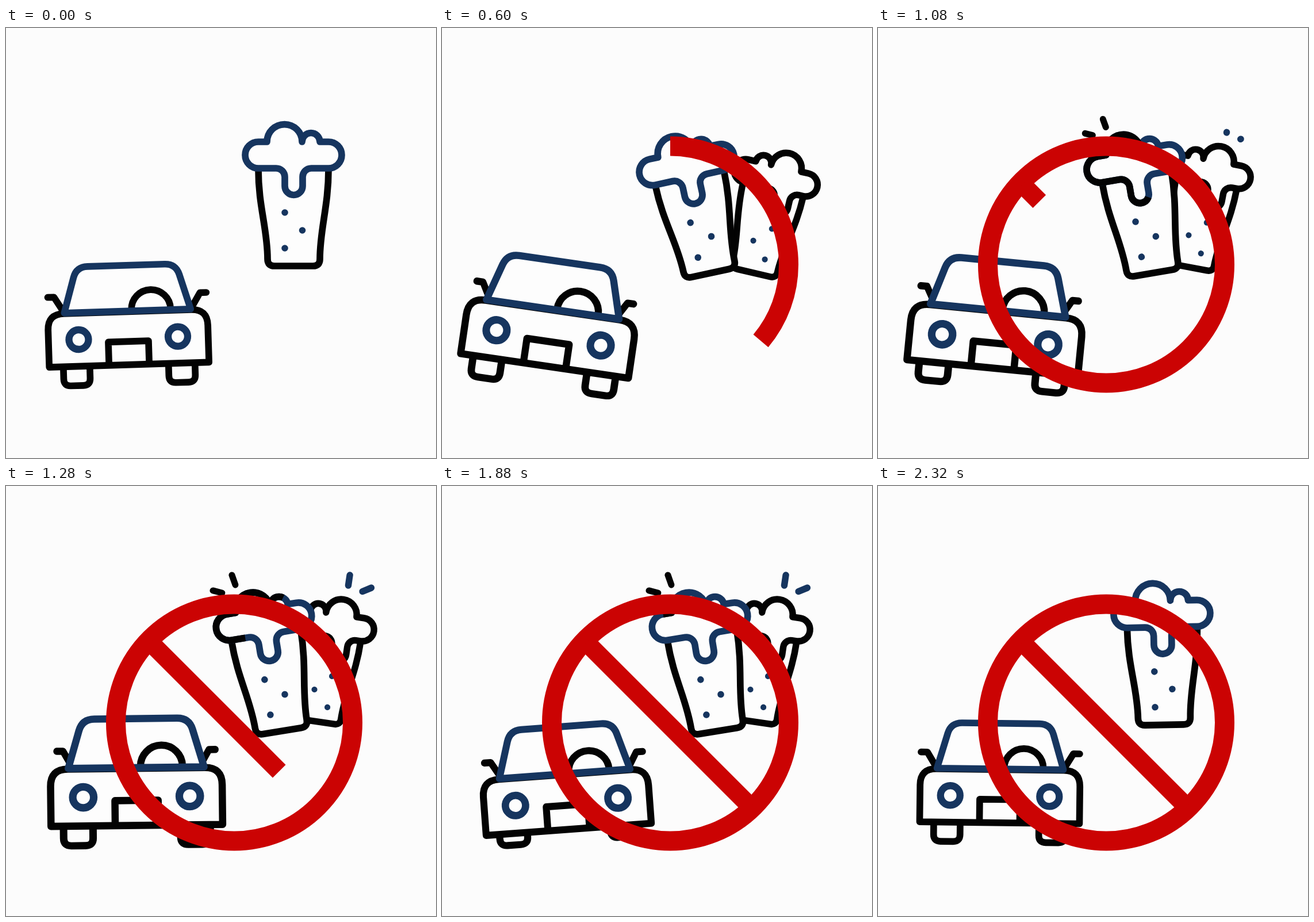
An HTML page with a canvas for the animation above (2.36 s loop, 748 by 748 pixels).

```html
<!DOCTYPE html>
<html lang="en">
<head>
<meta charset="utf-8">
<title>Don't drink and drive</title>
<style>
  html, body { margin: 0; width: 100%; height: 100%; overflow: hidden; background: #fcfcfc; }
  canvas { display: block; width: 100vw; height: 100vh; }
</style>
</head>
<body>
<canvas id="stage" width="748" height="748"></canvas>
<script>
const ctx = document.getElementById('stage').getContext('2d');
const LOOP = 2360, STEP = 40;
const BLUE = '#16355f', BLACK = '#030303', RED = '#cb0303', PAPER = '#fcfcfc', FILL = '#fdfdfd';

// Beer foam; the drip can sit further to one side.
const foam = shift => new Path2D(
  `M439 198H454A30.5 30.5 0 0 1 515 198A15.5 15.5 0 0 1 546 198H561A23 23 0 0 1 561 244
   H${531 - shift}a15 15 0 0 0 -15 15v16a15.5 15.5 0 0 1 -31 0v-16a15 15 0 0 0 -15 -15
   H439A23 23 0 0 1 439 198Z`);
const FOAM_LENGTH = 508;
const FRONT_FOAM = foam(0), REAR_FOAM = foam(21.5);
const GLASS = new Path2D('M439 246C439 310 455 350 455 402Q455 414 467 414H534Q546 414 546 402' +
  'C546 350 561 310 561 246');

const BODY = new Path2D('M-139 46.5V-18Q-139 -46 -111 -46H111Q139 -46 139 -18V46.5Z');
const SCREEN = new Path2D('M-110 -47L-92 -108Q-86.5 -126.5 -67 -126.5H67Q86.5 -126.5 92 -108L110 -47Z');
const STEERING = new Path2D('M7 -49A34 34 0 0 1 75 -49');
const PLATE = new Path2D('M-35 46V6H35V46');
const MIRRORS = new Path2D('M-138 -75H-127L-113 -52M138 -75H127L113 -52');

// Smooth progress from 0 to 1 between two times.
function ease(t, from, to) {
  const u = Math.min(1, Math.max(0, (t - from) / (to - from)));
  return u * u * (3 - 2 * u);
}

function place(x, y, degrees, sx, sy, draw) {
  ctx.save();
  ctx.translate(x, y);
  ctx.rotate(degrees * Math.PI / 180);
  ctx.scale(sx, sy);
  draw();
  ctx.restore();
}

function stroke(path, color, width = 11.7) {
  ctx.strokeStyle = color;
  ctx.lineWidth = width;
  ctx.stroke(path);
}

function fill(path, color) {
  ctx.fillStyle = color;
  ctx.fill(path);
}

function circle(x, y, r) {
  const path = new Path2D();
  path.arc(x, y, r, 0, 2 * Math.PI);
  return path;
}

// A clink mark that grows from (x, y) by (dx, dy).
function mark(x, y, dx, dy, grown, color, width) {
  if (grown <= 0) return;
  const path = new Path2D();
  path.moveTo(x, y);
  path.lineTo(x + dx * grown, y + dy * grown);
  ctx.lineCap = 'round';
  stroke(path, color, width);
  ctx.lineCap = 'butt';
}

function drawGlass(foamPath, foamColor, width) {
  ctx.translate(-515.5, -352);
  fill(GLASS, FILL);
  stroke(GLASS, BLACK, width);
  for (const [x, y] of [[485, 321], [515.5, 352], [485, 383]]) fill(circle(x, y, 5.8), BLUE);
  fill(foamPath, FILL);
  stroke(foamPath, foamColor, width);
}

function drawRear(t) {
  const grow = ease(t, 0, 400), out = ease(t, 400, 642);
  const settle = ease(t, 800, 1280), home = ease(t, 1900, 2240);
  const x = 491 - 12 * grow + 68 * out - 10.5 * settle - 45 * home;
  const y = 335 + 22.7 * grow + 13.3 * out - 17 * settle - 16 * home;
  const angle = -3 + 17.4 * out - 6 * settle - 8.4 * home;
  const size = 0.6 + 0.28 * (grow - home);
  place(x, y, angle, -size, size, () => {
    drawGlass(REAR_FOAM, BLACK, 13);
    const grown = ease(t, 1060, 1240) - ease(t, 2080, 2230);
    mark(479.3, 138.8, 0, -20.7, grown, BLUE, 13);
    mark(449.9, 146.5, -16.3, -9.8, grown, BLUE, 13);
  });
}

// A dark stretch runs around the blue foam outline.
function drawShade(t) {
  const reach = ease(t, 800, 1080), turn = ease(t, 1080, 1560), fade = ease(t, 1560, 1880);
  const from = 105 - 290 * reach + 230 * turn - 45 * fade;
  const to = 125 - 17 * reach + 97 * turn - 188 * fade;
  const length = (to - from) * ease(t, 700, 800) * (1 - ease(t, 1880, 2080));
  if (length < 0.5) return;
  ctx.setLineDash([length, FOAM_LENGTH - length]);
  ctx.lineDashOffset = -from;
  stroke(FRONT_FOAM, BLACK);
  ctx.setLineDash([]);
}

function drawFront(t) {
  const swing = ease(t, 0, 500), clink = ease(t, 800, 1150), home = ease(t, 1880, 2440);
  const x = 515.5 - 47 * swing + 16.5 * clink + 30.5 * home;
  const y = 352 + 10.5 * (swing - home);
  const angle = -12.2 * swing + 2.9 * clink + 9.3 * home;
  place(x, y, angle, 1, 1, () => {
    drawGlass(FRONT_FOAM, BLUE);
    drawShade(t);
    const grown = ease(t, 920, 1140) - ease(t, 2100, 2240);
    mark(461.4, 150.1, -3.2, -17.8, grown, BLACK, 11);
    mark(436.4, 160.2, -15.1, -6.6, grown, BLACK, 11);
  });
}

function drawWheel(x, bottom) {
  const wheel = new Path2D(`M${x - 23} ${bottom - 38}V${bottom - 12}q0 12 12 12h22q12 0 12 -12V${bottom - 38}`);
  stroke(wheel, BLACK);
}

function drawCar(t) {
  const left = ease(t, 110, 800), right = ease(t, 800, 1370), home = ease(t, 1560, 2045);
  const x = 212.75 - 34.25 * left + 52 * right - 18.5 * home;
  const angle = -1.8 + 12.7 * left - 15.1 * ease(t, 800, 1500) + 4.9 * ease(t, 1880, 2320);
  const size = 1 + 0.074 * (ease(t, 0, 820) - ease(t, 1600, 2150));
  const bounce = 6.3 * ease(t, 0, 400) - 13.3 * ease(t, 400, 800) + 9.5 * ease(t, 800, 1080)
    - 3.5 * ease(t, 1080, 1560) + 11 * ease(t, 1560, 1880) - 10 * ease(t, 1880, 2320);
  const wheelBottom = 41 + Math.min(41, 39 - 1.4 * bounce);
  place(x, 539.3 + bounce, angle, size, size, () => {
    place(0, 0, 0, (1 + size) / 2, 1, () => {
      drawWheel(-91.5, wheelBottom);
      drawWheel(91.5, wheelBottom);
    });
    place(0, 0, 0, 1 / size, 1, () => {
      ctx.lineCap = 'round';
      stroke(MIRRORS, BLACK);
    });
    fill(BODY, FILL);
    stroke(BODY, BLACK);
    fill(SCREEN, FILL);
    stroke(STEERING, BLACK);
    stroke(SCREEN, BLUE);
    stroke(PLATE, BLACK);
    for (const side of [-1, 1]) stroke(circle(86.3 * side, 0, 17), BLUE, 12.3);
  });
}

function drawBan(t) {
  const ring = ease(t, 400, 892), bar = ease(t, 1000, 1400);
  if (ring > 0) {
    const path = new Path2D();
    path.arc(397, 411.5, 206, -Math.PI / 2, (2 * ring - 0.5) * Math.PI);
    stroke(path, RED, 34);
  }
  if (bar > 0) {
    const path = new Path2D();
    path.moveTo(251, 272);
    path.lineTo(251 + 286 * bar, 272 + 286 * bar);
    stroke(path, RED, 32);
  }
}

function drawFrame(elapsed) {
  const t = Math.floor((elapsed % LOOP) / STEP) * STEP;
  ctx.fillStyle = PAPER;
  ctx.fillRect(0, 0, 748, 748);
  ctx.lineJoin = 'round';
  drawRear(t);
  drawFront(t);
  drawCar(t);
  drawBan(t);
}

let start;
function tick(now) {
  start ??= now;
  drawFrame(Math.max(0, now - start));
  requestAnimationFrame(tick);
}
drawFrame(0);
requestAnimationFrame(tick);
</script>
</body>
</html>
```
